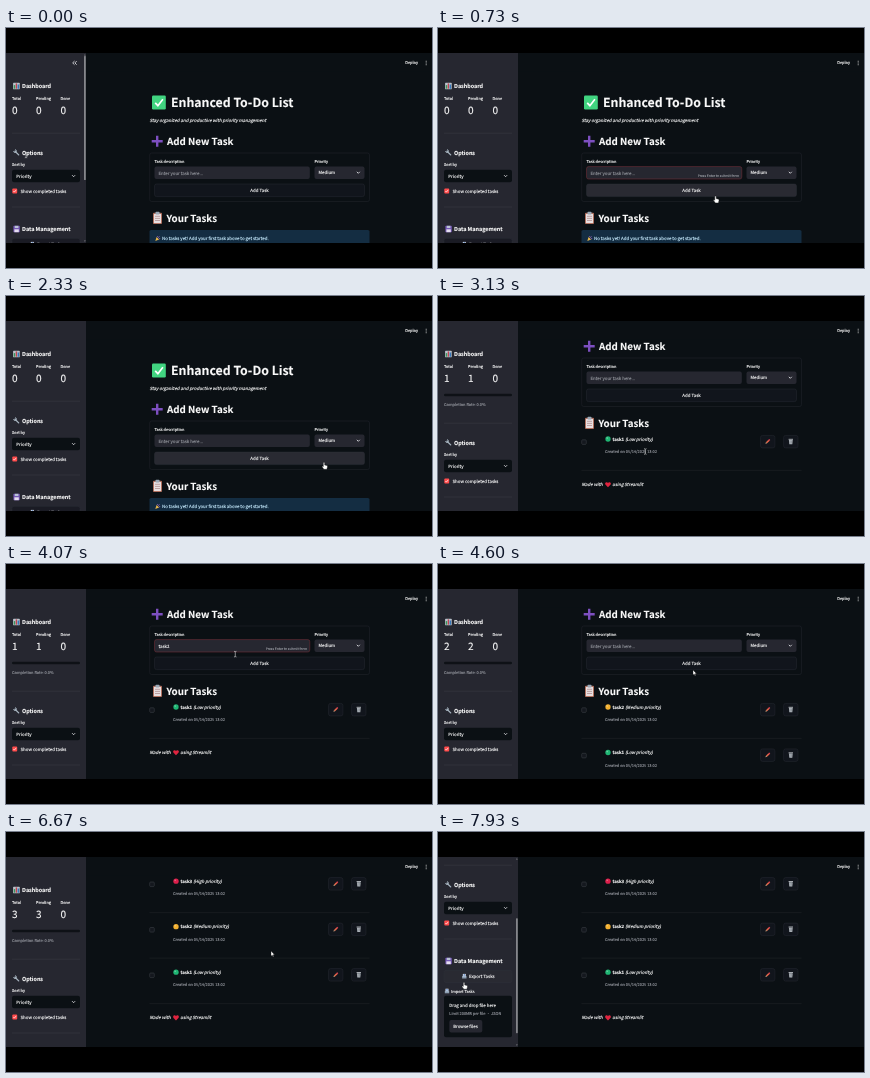
These frames come from a looping animation (426x240 px, 8 s). An HTML page:

```html
<!DOCTYPE html>
<html lang="en">
<head>
<meta charset="utf-8">
<title>Enhanced To-Do List</title>
<style>
  html, body { margin: 0; width: 100%; height: 100%; overflow: hidden; background: #000; }
  svg { display: block; width: 100vw; height: 100vh; }
  text {
    font: 4.4px "Noto Sans CJK SC", "Noto Sans CJK JP", "Noto Sans CJK", "Noto Sans", sans-serif;
    color: #fafafa; fill: currentColor; stroke: currentColor; stroke-width: .13;
    text-rendering: geometricPrecision; white-space: pre;
  }
  .small { font-size: 3.93px; }
  .tiny { font-size: 3.35px; }
  .dim { color: #92959c; }
  .info { color: #c7ebff; }
  .h1 { font-size: 12.3px; font-weight: 700; }
  .h2 { font-size: 9.75px; font-weight: 600; }
  .h3 { font-size: 5.45px; font-weight: 600; }
  .num { font-size: 10.1px; }
  .it { font-style: italic; }
  .bold { font-weight: 700; }
  .bg { fill: #0b1014; }
  .panel { fill: #262730; }
  .button { fill: #11151c; stroke: #33363d; stroke-width: .35; }
  .side.button { fill: #1a1b24; }
  .button.hover { fill: #292a32; }
  .rule { stroke: #fff; stroke-opacity: .14; stroke-width: .35; }
  .line { fill: none; stroke: #e6e6ea; stroke-width: .85; }
  .hidden { display: none; }
</style>
</head>
<body>
<svg viewBox="0 0 426 240" preserveAspectRatio="none">
  <defs>
    <path id="chevron" class="line" d="m-1.5-.8 1.5 1.5 1.5-1.5"/>
    <g id="chart">
      <rect x="-3.3" y="-3.3" width="6.6" height="6.6" rx=".6" fill="#b9c3cc"/>
      <path d="M-2.6 2.7v-3.6h1.4v3.6z" fill="#38955a"/>
      <path d="M-.7 2.7v-5.3h1.4v5.3z" fill="#c04550"/>
      <path d="M1.2 2.7v-4.3h1.4v4.3z" fill="#3577bc"/>
    </g>
    <g id="wrench" fill="none" stroke="#a9b7c2">
      <path d="M-1.3-1.3 2.4 2.4" stroke-width="1.3" stroke-linecap="round"/>
      <path d="M-2.7-1.4a1.4 1.4 0 1 0 1.4-1.4" stroke-width=".9"/>
    </g>
    <g id="disk">
      <rect x="-3.2" y="-3.2" width="6.4" height="6.4" rx=".7" fill="#7458b4"/>
      <path d="M-1.8-3.2h3.6v2.2h-3.6z" fill="#b9c3d4"/>
      <path d="M-2.2.3h4.4v2.9h-4.4z" fill="#e4dcf0"/>
    </g>
    <g id="tray">
      <path d="M-2.2-.2h4.4v2.5h-4.4z" fill="#8d9fb2"/>
      <path d="M-1.5-2.3h3v2.6h-3z" fill="#dce5ef"/>
      <path d="M0-1.8v2M-.8-.8 0-1.8l.8 1" fill="none" stroke="#4774bd" stroke-width=".6"/>
    </g>
    <g id="clipboard">
      <rect x="-4.5" y="-5.3" width="9" height="11.3" rx="1" fill="#b0705f"/>
      <path d="M-3.5-4h7v9h-7z" fill="#e8dfe0"/>
      <rect x="-2" y="-6.2" width="4" height="2.6" rx=".7" fill="#9aa8b6"/>
      <path d="M-2.5-1.7h5M-2.5.4h5M-2.5 2.5h5" stroke="#a98688" stroke-width=".7"/>
    </g>
    <g id="party">
      <path d="m-2.4 2.5 1.3-3.9 2.5 2.5z" fill="#e7b64c"/>
      <path d="M-.4-1.6-.1-2.5M.6-.7 1.7-2.2M1.3.3 2.5.1" stroke="#b774d8" stroke-width=".7"/>
    </g>
    <path id="heart" d="M0 2.6C-1.3 1.4-2.9.3-2.9-1A1.5 1.5 0 0 1 0-1.5 1.5 1.5 0 0 1 2.9-1C2.9.3 1.3 1.4 0 2.6z" fill="#e0243f"/>
    <g id="pencil">
      <g transform="rotate(45)">
        <path d="M-.75-1.7h1.5v3.4h-1.5z" fill="#e9664a"/>
        <path d="M-.75-2.9h1.5v1.2h-1.5z" fill="#e23f57"/>
        <path d="M-.75 1.7h1.5L0 3.2z" fill="#efc99a"/>
      </g>
    </g>
    <g id="bin">
      <path d="M-1.9-1.6h3.8l-.4 4.2h-3z" fill="#aeb4ba"/>
      <path d="M-2.2-2.3h4.4" stroke="#d0d4d8" stroke-width=".8"/>
      <path d="M-.7-1v3M.7-1v3" stroke="#666d74" stroke-width=".4"/>
    </g>
  </defs>

  <rect class="bg" y="25" width="426" height="190"/>

  <g id="page">
    <rect x="146" y="67.6" width="13.8" height="13.8" rx="1.2" fill="#41d480"/>
    <path d="m149.2 74.8 2.7 2.9 5-6.4" fill="none" stroke="#fff" stroke-width="1.7"/>
    <text class="h1" x="165" y="79.2">Enhanced To-Do List</text>
    <text class="it" x="143.5" y="93.8">Stay organized and productive with priority management</text>

    <path d="M151.2 107.7v11M145.7 113.2h11" stroke="#7d4fc0" stroke-width="2.4"/>
    <text class="h2" x="161" y="116.8">Add New Task</text>
    <rect x="143.7" y="125" width="219.8" height="48.5" rx="2" fill="none" stroke="#292d34" stroke-width=".4"/>
    <text class="small" x="148.5" y="134.5">Task description</text>
    <text class="small" x="308.5" y="134.5">Priority</text>
    <rect id="field" class="panel" x="148.5" y="138.6" width="155.3" height="12.4" rx="2" stroke-width=".45"/>
    <text id="entry" x="152.5" y="146.5"></text>
    <text id="hint" class="tiny dim" x="301" y="148.8" text-anchor="end">Press Enter to submit form</text>
    <rect class="panel" x="308.5" y="138.6" width="50" height="12.4" rx="2"/>
    <text id="choice" x="312.5" y="146.3"></text>
    <use href="#chevron" x="352.3" y="144.6"/>
    <rect id="add" class="button" x="148.5" y="156" width="210" height="12.6" rx="2"/>
    <text x="253.5" y="163.9" text-anchor="middle">Add Task</text>

    <use href="#clipboard" x="151.5" y="190"/>
    <text class="h2" x="160.5" y="193.8">Your Tasks</text>
    <g id="empty">
      <rect x="143.5" y="202" width="220" height="16.5" rx="1.6" fill="#142d42"/>
      <use href="#party" x="151.7" y="210.5"/>
      <text class="info" x="156" y="212.2">No tasks yet! Add your first task above to get started.</text>
    </g>
    <g id="rows"></g>
    <g id="footer">
      <text class="it" x="143.5" y="207.8">Made with</text>
      <use href="#heart" x="170" y="206.1"/>
      <text class="it" x="174.3" y="207.8">using Streamlit</text>
    </g>
    <g id="menu">
      <rect x="308.5" y="152.5" width="50" height="38" rx="2" fill="#11151c" stroke="#30333b" stroke-width=".4"/>
      <rect id="active" class="panel" x="309" width="49" height="12"/>
      <text x="312.5" y="161">High</text>
      <text x="312.5" y="173">Medium</text>
      <text x="312.5" y="185">Low</text>
    </g>
  </g>

  <rect class="bg" x="80" y="25" width="346" height="18.5"/>
  <text class="small" x="399.2" y="36.4">Deploy</text>
  <path d="M420.2 33.2v.01m0 1.79v.01m0 1.79v.01" stroke="#fafafa" stroke-width=".9" stroke-linecap="round"/>

  <rect class="panel" y="25" width="80" height="190"/>
  <g id="sidebar">
    <path id="collapse" class="line" d="m68.5 33.1-1.8 1.8 1.8 1.8m2.2-3.6-1.8 1.8 1.8 1.8"/>
    <use href="#chart" x="10.4" y="58"/>
    <text class="h3" x="16" y="60">Dashboard</text>
    <text class="small" x="6" y="72">Total</text>
    <text class="small" x="30" y="72">Pending</text>
    <text class="small" x="54.5" y="72">Done</text>
    <text id="total" class="num" x="6" y="85.5"></text>
    <text id="pending" class="num" x="30" y="85.5"></text>
    <text class="num" x="54.5" y="85.5">0</text>
    <g id="progress">
      <rect x="6" y="97.8" width="68" height="2.5" rx="1.2" fill="#0e1116"/>
      <text class="small dim" x="6" y="110.2">Completion Rate: 0.0%</text>
    </g>
    <g id="tools">
      <path class="rule" d="M6 105.2h68M6 179h68"/>
      <use href="#wrench" x="10.3" y="124.5"/>
      <text class="h3" x="16" y="126.5">Options</text>
      <text class="small" x="6" y="138.4">Sort by</text>
      <rect class="bg" x="6" y="141.8" width="68" height="12.4" rx="2"/>
      <text x="10.3" y="149.7">Priority</text>
      <use href="#chevron" x="67.6" y="148"/>
      <rect x="6.3" y="160.5" width="4.9" height="4.9" rx=".9" fill="#ff4b4b"/>
      <path d="m7.4 163 1 1.1 1.8-2.2" fill="none" stroke="#fff" stroke-width=".7"/>
      <text x="14.5" y="164.6">Show completed tasks</text>
      <use href="#disk" x="10.6" y="201"/>
      <text class="h3" x="16" y="203.1">Data Management</text>
      <rect id="export" class="side button" x="6" y="210.3" width="68" height="12.3" rx="2"/>
      <use href="#tray" x="26.3" y="216.2"/>
      <text x="31" y="218">Export Tasks</text>
      <use href="#tray" x="9" y="231"/>
      <text class="small" x="13" y="232.6">Import Tasks</text>
      <rect class="bg" x="6" y="235.8" width="68" height="41.5" rx="2"/>
      <text x="11.3" y="246.7">Drag and drop file here</text>
      <text class="small dim" x="11.3" y="255.3">Limit 200MB per file • JSON</text>
      <rect class="panel" x="11.3" y="260" width="33" height="12.5" rx="2"/>
      <text x="15.2" y="268">Browse files</text>
    </g>
  </g>
  <g id="scrollbar" fill="#85868b">
    <path d="m78 27.4.9-1.2.9 1.2zM78 212.6l.9 1.2.9-1.2z"/>
    <rect id="thumb" x="78" width="1.8" rx=".6"/>
  </g>

  <rect width="426" height="25"/>
  <rect y="215" width="426" height="25"/>

  <g id="cursor" stroke="#111" stroke-width=".4">
    <path id="arrow" d="M0 0v5.2l1.2-1.1.8 1.7.8-.4-.8-1.6h1.6z" fill="#fff"/>
    <path id="hand" d="M-.7.6a.7.7 0 0 1 1.4 0v2l2.3.6q.7.3.5 1.2l-.6 2.5h-3L-2 4.4q-.1-.9.7-.6l.6.5z" fill="#fff"/>
    <path id="beam" d="M-1.2-2.8q1.2 0 1.2.7v4.2q0 .7-1.2.7M1.2-2.8q-1.2 0-1.2.7m0 4.2q0 .7 1.2.7" fill="none" stroke="#ddd" stroke-width=".6"/>
  </g>
</svg>

<script>
const LOOP = 8000, ROW = 45.5;
const TRACK = 185, SIDE_HEIGHT = 276;
const $ = id => document.getElementById(id);
const show = (id, on) => $(id).classList.toggle('hidden', !on);
const hover = (id, on) => $(id).classList.toggle('hover', on);
const shift = (id, x, y) => $(id).setAttribute('transform', `translate(${x} ${y})`);
const within = (t, from, to) => t >= from && t < to;

const tasks = [
  { level: 'Low', color: '#1fb573', typed: 930, picked: 1760, sent: 2250, added: 2400 },
  { level: 'Medium', color: '#f3b02f', typed: 3650, picked: 3650, sent: 4450, added: 4470 },
  { level: 'High', color: '#dc1f4b', typed: 4950, picked: 5740, sent: 6070, added: 6130 }
];
const focusSpans = [[400, 1350], [3560, 4250], [4880, 5400]];
const menuSpans = [[1400, 1760], [5450, 5740]];

// Each stop: time, then the values reached at that time.
const path = [
  [0, 20, 127, 'beam'], [70, 22, 128, 'beam'], [340, 225, 145, 'beam'], [460, 225, 145, 'beam'],
  [730, 277.5, 168, 'hand'], [1000, 277.5, 168, 'hand'], [1350, 330, 145, 'hand'],
  [1450, 330, 146, 'hand'], [1740, 322, 183, 'hand'], [2100, 318, 166.4, 'hand'],
  [2400, 318, 166.4, 'hand'], [2750, 250, 150, 'arrow'], [3130, 207.3, 155.5, 'beam'],
  [3500, 215, 83, 'beam'], [3950, 215, 83, 'beam'], [4250, 255, 103, 'hand'],
  [4460, 255, 103, 'hand'], [4600, 255, 105.9, 'arrow'], [4850, 225, 83, 'beam'],
  [5200, 225, 83, 'beam'], [5400, 330, 82, 'hand'], [5480, 330, 82, 'hand'],
  [5730, 325, 96, 'hand'], [5960, 280, 101, 'hand'], [6140, 280, 101, 'hand'],
  [6500, 265, 119, 'arrow'], [6750, 265, 119, 'arrow'], [7200, 40, 130, 'arrow'],
  [7650, 36, 132, 'arrow'], [7870, 26, 150.3, 'hand'], [8000, 26, 150.3, 'hand']
];
const pageScroll = [[0, 0], [2420, 0], [2590, 63], [6190, 63], [6520, 156.8]];
const sideScroll = [[0, 0], [7300, 0], [7700, 94]];

function sample(stops, t) {
  const i = stops.findLastIndex(stop => stop[0] <= t);
  const a = stops[i], b = stops[i + 1] || a;
  const p = b === a ? 0 : (t - a[0]) / (b[0] - a[0]);
  const ease = p * p * (3 - 2 * p);
  return a.slice(1).map((v, k) =>
    typeof v === 'number' ? v + (b[k + 1] - v) * ease : p < .6 ? v : b[k + 1]);
}

$('rows').innerHTML = tasks.map(({ level, color }, i) => `
  <g id="row${i}">
    <rect x="143.7" y="206.8" width="4.6" height="4.6" rx="1" fill="#14181e" stroke="#41444b" stroke-width=".5"/>
    <circle cx="170" cy="206" r="2.65" fill="${color}"/>
    <circle cx="169.2" cy="205.1" r=".8" fill="#fff" opacity=".35"/>
    <text x="174.4" y="207.7"><tspan class="bold">task${i + 1}</tspan><tspan class="it"> (${level} priority)</tspan></text>
    <text class="small dim" x="167" y="220.3">Created on 05/14/2025 13:02</text>
    <rect class="button" x="322.5" y="202.4" width="14.4" height="12.5" rx="2"/>
    <rect class="button" x="345.6" y="202.4" width="14.4" height="12.5" rx="2"/>
    <use href="#pencil" x="329.7" y="208.6"/>
    <use href="#bin" x="352.8" y="208.6"/>
    <path class="rule" d="M143.5 237.4h220"/>
  </g>`).join('');

function render(t) {
  const count = tasks.filter(task => t >= task.added).length;
  const [x, y, kind] = sample(path, t);
  const [scroll] = sample(pageScroll, t);
  const [side] = sample(sideScroll, t);
  const drop = count ? 22 : 0;

  shift('page', 0, -scroll);
  show('empty', !count);
  show('footer', count);
  shift('footer', 0, count * ROW);
  tasks.forEach((task, i) => {
    show('row' + i, i < count);
    shift('row' + i, 0, (count - 1 - i) * ROW);
  });

  const index = tasks.findIndex(task => within(t, task.typed, task.sent));
  const current = tasks[index];
  const typed = current ? `task${index + 1}`.slice(0, 1 + Math.floor((t - current.typed) / 65)) : '';
  const focused = focusSpans.some(span => within(t, ...span));
  $('entry').textContent = typed || 'Enter your task here...';
  $('entry').setAttribute('class', typed ? '' : 'dim');
  $('field').setAttribute('stroke', focused ? '#86333b' : 'none');
  show('hint', focused);
  $('choice').textContent = current && t >= current.picked ? current.level : 'Medium';

  const open = menuSpans.some(span => within(t, ...span));
  const formY = y + scroll;
  const item = Math.max(0, Math.min(2, Math.floor((formY - 153) / 12)));
  show('menu', open);
  $('active').setAttribute('y', 153 + item * 12);
  hover('add', !open && within(x, 148.5, 358.5) && within(formY, 156, 168.6));

  const overSide = x < 80;
  const ratio = TRACK / (SIDE_HEIGHT + drop);
  shift('sidebar', 0, -side);
  shift('tools', 0, drop);
  show('progress', count);
  $('total').textContent = $('pending').textContent = count;
  show('collapse', overSide);
  show('scrollbar', overSide);
  $('thumb').setAttribute('y', 28 + side * ratio);
  $('thumb').setAttribute('height', TRACK * ratio);
  hover('export', overSide && within(y + side - drop, 210.3, 222.6));

  shift('cursor', x, y);
  for (const name of ['arrow', 'hand', 'beam']) show(name, name === kind);
}

function tick(now) {
  render(now % LOOP);
  requestAnimationFrame(tick);
}
render(0);
requestAnimationFrame(tick);
</script>
</body>
</html>
```
